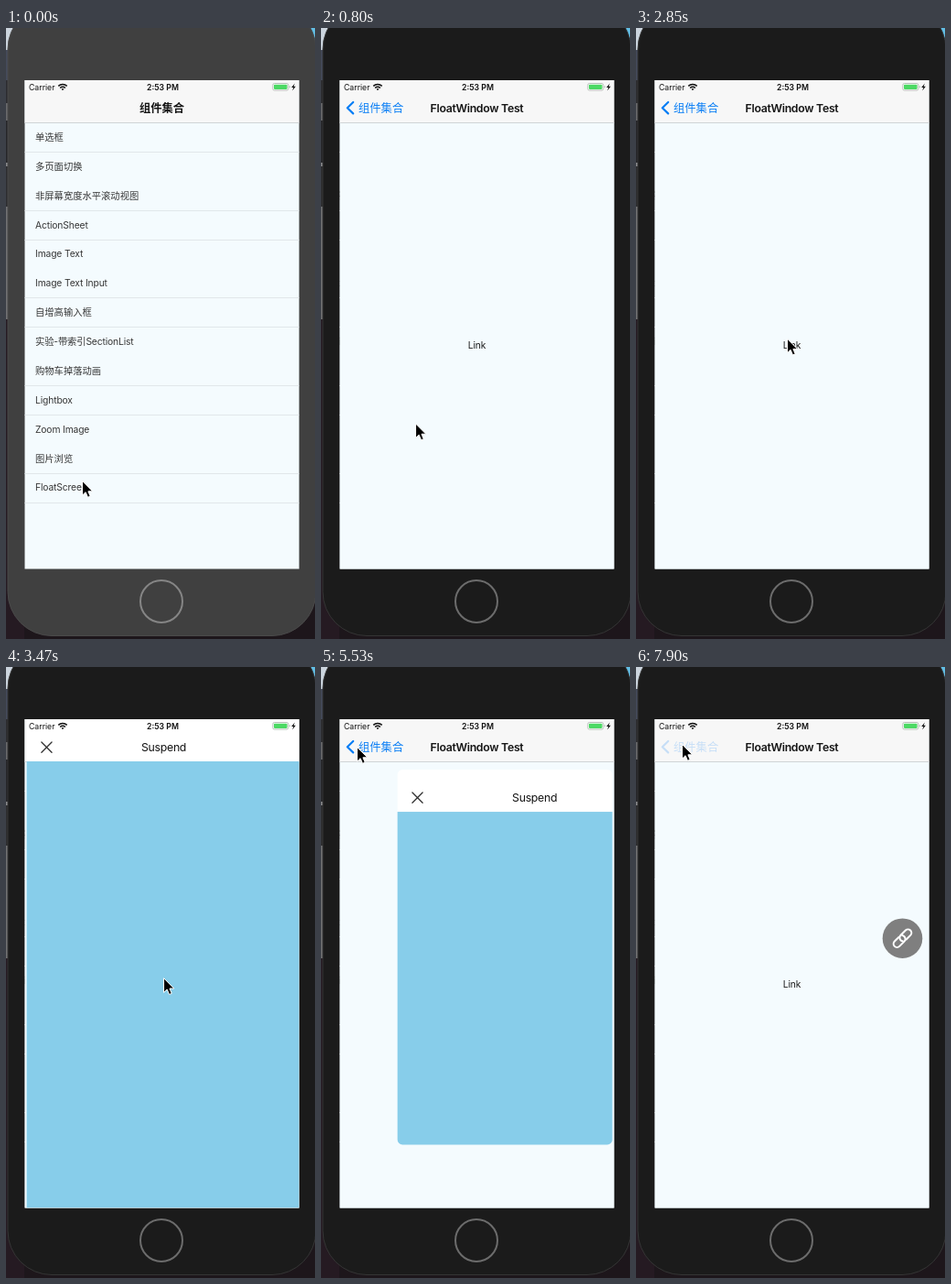
An HTML page that plays this animation: 338x667 px, repeating every 7990 ms.

```html
<!DOCTYPE html>
<html lang="zh">
<head>
<meta charset="utf-8">
<title>FloatWindow Test</title>
<style>
html, body { margin: 0; width: 100%; height: 100%; overflow: hidden; background: #1d161b; }
svg { display: block; width: 338px; height: 667px; }
text { font-family: Inter, 'Noto Sans CJK SC', 'Noto Sans CJK', sans-serif; }
.row { font-size: 10.3px; fill: #363636; }
.latin { letter-spacing: -.14px; }
.title { font-size: 12.3px; fill: #151515; text-anchor: middle; letter-spacing: -.3px; }
.bold { font-weight: 600; }
.cjk { letter-spacing: 0; }
.bar { font-size: 8.7px; fill: #111; }
.line { fill: none; stroke-linecap: round; stroke-linejoin: round; }
</style>
</head>
<body>
<svg viewBox="0 0 338 667">
  <defs>
    <clipPath id="screen"><rect x="20.5" y="57" width="300" height="533.5"/></clipPath>
    <clipPath id="cardClip"><rect id="cardBox"/></clipPath>
    <path id="loop" d="M2 3.8H8.5a3.8 3.8 0 0 0 0-7.6H1a3.8 3.8 0 0 0-3.8 3.8c0 1 .3 1.8.8 2.4"/>
  </defs>

  <!-- desktop -->
  <rect width="338" height="667" fill="#1d161b"/>
  <rect width="30" height="24" fill="#ccd5de"/>
  <rect x="300" width="38" height="40" fill="#62bfe6"/>
  <g id="strip"></g>

  <!-- phone -->
  <rect id="body" x="2" y="-25" width="337" height="688.5" rx="48"/>
  <circle id="home" cx="170" cy="626" r="23" fill="none" stroke-width="2"/>

  <g clip-path="url(#screen)">
    <rect x="20" y="57" width="301" height="534" fill="#f4fbfe"/>
    <g id="list"></g>
    <g id="page">
      <rect x="20.5" y="103" width="301" height="488" fill="#f4fbfe"/>
      <text id="link" class="row latin" x="170.5" y="350.4" text-anchor="middle" style="fill:#1c1c1c">Link</text>
    </g>

    <rect x="20" y="57" width="301" height="46.5" fill="#f7f7f7"/>
    <rect x="20" y="103" width="301" height="1" fill="#d0d4d6"/>
    <text id="oldTitle" class="title bold cjk" x="170.5" y="91.6">组件集合</text>
    <text id="newTitle" class="title bold" x="170.5" y="91.6">FloatWindow Test</text>
    <g id="back">
      <path class="line" d="M35.2 81L28.8 87.2 35.2 93.4" stroke="#0a7ef5" stroke-width="2.2"/>
      <text id="backText" x="41" y="91.6" font-size="12.3" fill="#0a7ef5">组件集合</text>
    </g>

    <g id="button">
      <circle cx="291.5" cy="296.2" r="21.8" fill="#7f7f7f"/>
      <g class="line" transform="translate(291.5 296.2) rotate(-45)" stroke="#fff" stroke-width="2">
        <use href="#loop"/>
        <use href="#loop" transform="rotate(180)"/>
      </g>
    </g>

    <g id="card" clip-path="url(#cardClip)">
      <g id="cardBody">
        <rect x="20" y="57" width="301" height="46.5" fill="#fff"/>
        <rect x="20" y="103" width="301" height="488" fill="#87cdea"/>
        <path id="close" class="line" d="M36.8 82L48 93.2M48 82L36.8 93.2" stroke="#333" stroke-width="1.3"/>
        <text class="title" x="170.5" y="91.8">Suspend</text>
      </g>
    </g>

    <!-- status bar -->
    <text class="bar" x="25" y="67.7">Carrier</text>
    <g class="line" stroke="#111" stroke-width="1.5" style="stroke-linecap:butt">
      <path d="M57.3 63.4a6.6 6.6 0 0 1 9.4 0M59.2 65.4a3.9 3.9 0 0 1 5.6 0"/>
      <path d="M62 68.2l-1.3-1.5a1.8 1.8 0 0 1 2.6 0z" fill="#111" stroke="none"/>
    </g>
    <text class="bar bold" x="171.5" y="67.7" text-anchor="middle">2:53 PM</text>
    <rect x="291.8" y="60.5" width="17" height="7.6" rx="1.8" fill="#fff" stroke="#a9b3aa" stroke-width=".8"/>
    <rect x="293" y="61.7" width="14.6" height="5.2" rx=".8" fill="#4cd964"/>
    <path d="M309.8 63v2.6q1-.3 1-1.3t-1-1.3" fill="#a9b3aa"/>
    <path d="M315.8 60.5L312.2 65h2.2l-1.2 3.4 3.7-4.7h-2.2z" fill="#111"/>
  </g>

  <path id="cursor" d="M0 0V15.6L3.6 12.2 6 17.8 8.7 16.7 6.4 11.3H11.2Z" fill="#000" stroke="#fff" stroke-width="1"/>
</svg>
<script>
const LOOP = 7990;
const $ = id => document.getElementById(id);
const set = (id, attrs) => {
  for (const k in attrs) $(id).setAttribute(k, attrs[k]);
};
const add = (parent, tag, attrs, text = '') => {
  const el = document.createElementNS('http://www.w3.org/2000/svg', tag);
  for (const k in attrs) el.setAttribute(k, attrs[k]);
  el.textContent = text;
  $(parent).append(el);
};

const rows = ['单选框', '多页面切换', '非屏幕宽度水平滚动视图', 'ActionSheet', 'Image Text',
  'Image Text Input', '自增高输入框', '实验-带索引SectionList', '购物车掉落动画',
  'Lightbox', 'Zoom Image', '图片浏览', 'FloatScreen'];
rows.forEach((label, i) => {
  const y = 119.2 + i * 31.88;
  add('list', 'text', { id: 'row' + i, x: 32, y: y + 3.7, class: /[A-Z]/.test(label) ? 'row latin' : 'row' }, label);
  if (i % 3 != 1) add('list', 'rect', { x: 20, y: Math.round(y + 15.8), width: 301, height: 1, fill: '#e1e7ea' });
});

// windows seen past the left edge of the phone: top, bottom, colour
[[24, 57, '#454b5c'], [57, 82, '#2b2b2f'], [82, 101, '#6a6a6c'], [101, 147, '#252528'],
 [147, 151, '#8a8a8c'], [151, 195, '#2c2c2f'], [195, 318, '#727274'], [318, 667, '#251a22']]
  .forEach(([a, b, fill]) => add('strip', 'rect', { x: 0, y: a, width: 20, height: b - a, fill }));

// pointer: time, x, y
const path = [
  [0, 83.5, 494.5], [500, 83.5, 494.5], [800, 103.5, 432], [980, 108, 428], [1070, 108, 428],
  [1250, 117, 434], [1520, 116, 442], [1700, 116, 442], [1880, 131, 330], [2060, 118, 174],
  [2140, 118, 174], [2320, 108, 205], [2700, 160, 333], [2850, 165.5, 339], [2940, 165.5, 342],
  [3400, 165.5, 342], [3740, 196, 332], [4190, 196, 332], [4630, 35.5, 62], [4720, 24, 52],
  [4810, 21, 58], [4990, 35, 83], [5080, 39.5, 87.5], [5620, 39.5, 87.5], [6230, 234, 335],
  [6590, 280.5, 318.5], [6850, 292, 303], [6940, 292, 303], [7470, 3, 150], [7650, 14, 108],
  [7820, 50.5, 84.5], [LOOP, 50.5, 84.5]];

const mix = (a, b, p) => a + (b - a) * p;
const part = (t, start, length) => Math.min(1, Math.max(0, (t - start) / length));
const easeOut = p => 1 - (1 - p) ** 4;
const easeInOut = p => p < .5 ? 2 * p * p : 1 - 2 * (1 - p) ** 2;
const within = (t, a, b) => t >= a && t < b;

function pointAt(t) {
  const i = Math.max(1, path.findIndex(k => k[0] >= t));
  const [a, b] = [path[i - 1], path[i]];
  const p = part(t, a[0], b[0] - a[0]);
  return [mix(a[1], b[1], p), mix(a[2], b[2], p)];
}

const snap = t => t < 5440
  ? Math.floor((t + 9) / 89.2) * 89.2
  : 5440 + Math.floor((t - 5436) / 87.93) * 87.93;

function draw(t) {
  const active = t > 80;
  set('body', { fill: active ? '#1b1b1b' : '#404040', stroke: active ? '#353535' : '#4a4a4a' });
  set('home', { stroke: active ? '#6c6c6c' : '#858585' });

  const push = easeOut(part(t, 300, 500));
  set('row12', { opacity: within(t, 260, 600) ? .3 : 1 });
  set('list', { transform: `translate(${-90 * push})` });
  set('page', { transform: `translate(${300 * (1 - push)})` });
  set('oldTitle', { transform: `translate(${-105 * push})`, opacity: Math.max(0, 1 - push * 1.4) });
  set('newTitle', { transform: `translate(${110 * (1 - push)})`, opacity: push });
  set('backText', { transform: `translate(${80 * (1 - push)})` });
  set('back', { opacity: t > 7880 ? .2 : push });
  set('link', { opacity: within(t, 3015, 3300) ? .3 : 1 });

  const open = easeOut(part(t, 3080, 560));
  const fold = easeInOut(part(t, 5350, 500));
  const x = mix(20.5, 269.7, fold) + 300 * (1 - open);
  const y = mix(57, 274.4, fold);
  set('cardBox', {
    x, y, rx: 21.8 * fold,
    width: mix(300, 43.6, fold), height: mix(533.5, 43.6, fold)
  });
  set('cardBody', { transform: `translate(${x - 20.5} ${y - 57})` });
  set('card', { opacity: 1 - part(fold, .85, .15), display: open && fold < 1 ? 'inline' : 'none' });
  set('button', { opacity: part(fold, .8, .15) });
  set('close', { opacity: within(t, 5250, 5430) ? .25 : 1 });

  set('cursor', { transform: `translate(${pointAt(t)})` });
}

const begin = performance.now();
function frame() {
  draw(snap((performance.now() - begin) % LOOP));
  requestAnimationFrame(frame);
}
frame();
</script>
</body>
</html>
```
